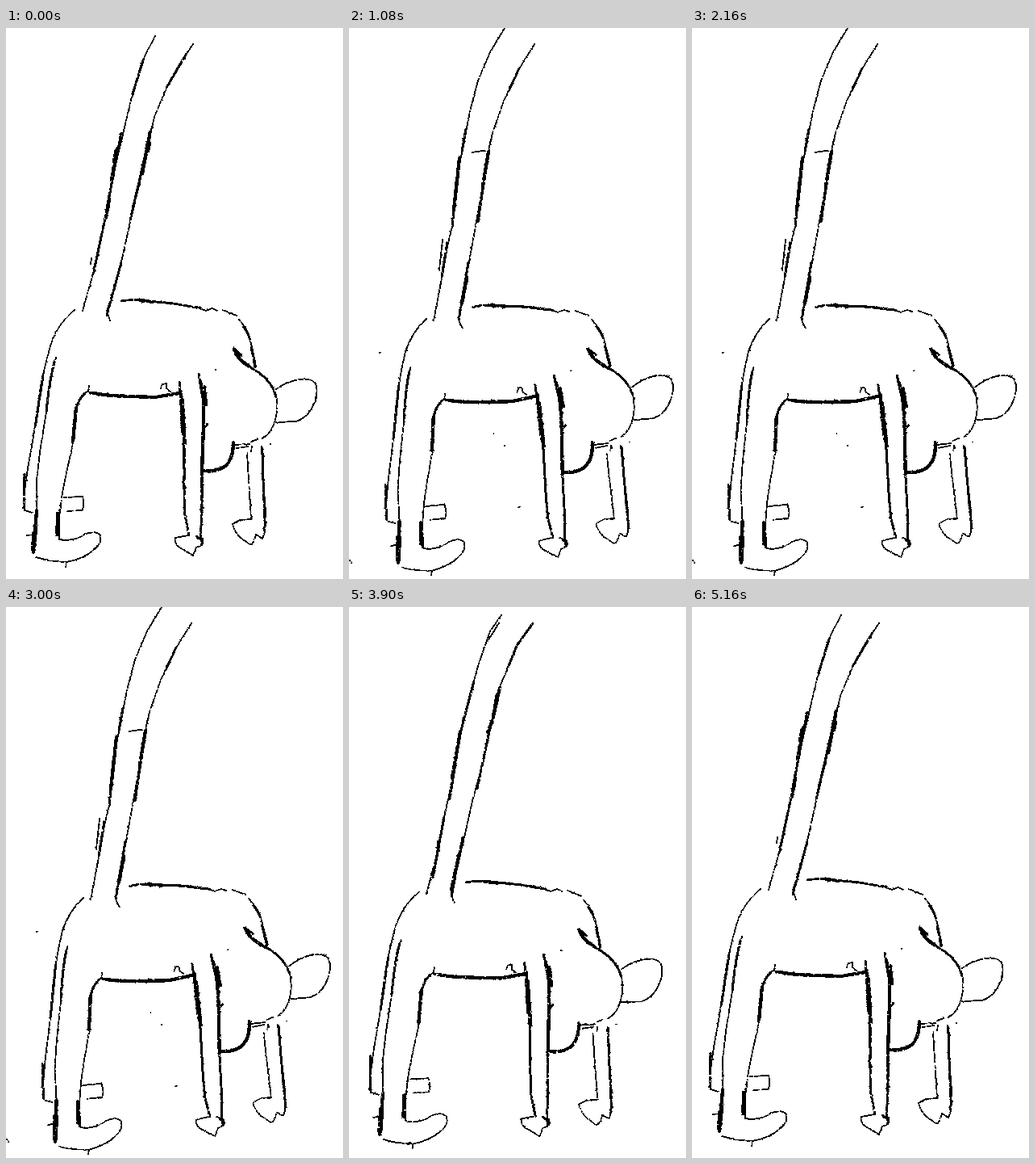
Write an HTML page without scripts that moves like this. It is 418x682 px and loops after 5.34 s.

```html
<!DOCTYPE html>
<html lang="en">
<head>
<meta charset="utf-8">
<title>Swaying sketch</title>
<style>
  html, body { margin: 0; width: 100%; height: 100%; overflow: hidden; background: #fff; }
  .stage { position: relative; width: 418px; height: 682px; overflow: hidden; }
  .strip { display: block; width: 2090px; height: 682px; animation: sway 5.34s step-end infinite; }
  path { fill: none; stroke: #000; stroke-width: 1.5; stroke-linecap: round; stroke-linejoin: round; }
  .mid { stroke-width: 2.7; }
  .bold { stroke-width: 4; }
  .heavy { stroke-width: 6; }

  /* The strip holds five poses side by side; each stop shows one. */
  @keyframes sway {
    0%, 26.96%, 47.19%, 69.66%, 96.62%, 100% { transform: translateX(0); }
    3.37%, 23.59%, 30.33%, 43.82%, 52.8%, 66.29%, 73.03%, 93.25% { transform: translateX(-418px); }
    6.74%, 20.22%, 33.7%, 40.44%, 56.17%, 62.92%, 76.4%, 89.88% { transform: translateX(-836px); }
    10.11%, 16.85%, 37.07%, 59.55%, 79.77%, 86.51% { transform: translateX(-1254px); }
    13.48%, 83.14% { transform: translateX(-1672px); }
  }
</style>
</head>
<body>
<div class="stage">
<svg class="strip" viewBox="0 0 2090 682">
  <defs>
    <!-- Rough, hard-edged pencil line -->
    <filter id="pencil" filterUnits="userSpaceOnUse" x="0" y="0" width="418" height="682" color-interpolation-filters="sRGB">
      <feTurbulence type="fractalNoise" baseFrequency=".28" numOctaves="1" seed="7" result="grain"/>
      <feDisplacementMap in="SourceGraphic" in2="grain" scale="2.6" xChannelSelector="R" yChannelSelector="G" result="rough"/>
      <feColorMatrix in="grain" values="0 0 0 0 0  0 0 0 0 0  0 0 0 0 0  0 0 6 0 -1.3" result="gaps"/>
      <feComposite in="rough" in2="gaps" operator="in"/>
      <feComponentTransfer><feFuncA type="discrete" tableValues="0 1 1"/></feComponentTransfer>
    </filter>

    <g id="body">
      <!-- back and shoulder -->
      <path class="mid" d="M143 338Q158 335 176 338L208 341 242 347"/>
      <path class="bold" d="M166 337L182 339"/>
      <path d="M236 345L248 350 256 347 262 350M269 349L286 356M289 361Q302 375 304 390L310 419M294 370Q306 386 308 415"/>
      <!-- head -->
      <path class="mid" d="M282 397Q287 411 300 418L313 426Q330 438 335 456M283 397L292 405M304 395L309 420"/>
      <path class="bold" d="M285 403Q292 413 302 419"/>
      <path d="M335 455Q338 470 334 485Q330 501 318 508M280 516L302 515M286 520L300 518M304 512L312 509"/>
      <path d="M335 447Q345 440 355 437Q376 431 384 440Q388 452 382 465Q375 482 360 487L335 488"/>
      <path class="bold" d="M282 513Q282 534 271 543Q260 550 246 548"/>
      <!-- far arm -->
      <path d="M299 526L301 560 304 606M305 518L304 524M317 518L319 560 322 600 320 622"/>
      <path class="mid" d="M318 520L319 560 321 610"/>
      <path d="M305 608L290 609 281 614Q284 625 291 631L302 639Q307 640 310 627L318 632Q322 624 322 612"/>
      <!-- near arm -->
      <path class="mid" d="M215 438L218 475 221 520 221 570 222 603 227 628"/>
      <path d="M220 460L223 515"/>
      <path class="bold" d="M217 450L219 500M241 437L246 466M245 462L245 490 243 550"/>
      <path class="mid" d="M239 428L241 440M243 540L243 600 241 633M246 443L249 467M250 490L245 495"/>
      <path class="mid" d="M241 633L236 629M243 632L242 640"/>
      <path d="M226 628L210 631Q208 640 219 645L232 653 236 643 243 640Q247 635 241 630"/>
      <path d="M192 446L194 441 199 440 199 446 204 450"/>
      <!-- belly -->
      <path class="mid" d="M103 451L125 454"/>
      <path class="bold" d="M108 452L130 455 155 456 185 457 215 452"/>
      <!-- near leg -->
      <path d="M103 443L102 449Q92 455 88 468L86 490 83 515 75 550 70 575 66 605 66 630M63 600L62 628"/>
      <path class="mid" d="M98 452Q89 460 87 473M65 600L64 628"/>
      <path class="bold" d="M87 470L83 512"/>
      <path d="M66 629Q63 634 75 634Q90 633 97 627Q112 621 117 628Q119 638 110 645Q97 657 75 661Q50 660 38 655M75 661L74 667"/>
      <path d="M62 408Q53 440 50 475L42 525 38 560 38 600"/>
      <path class="mid" d="M60 413Q54 435 50 475"/>
      <path class="bold" d="M38 598L36 622 34 649"/>
      <path class="heavy" d="M36 618L34 645"/>
      <path d="M26 628L34 627"/>
      <!-- far leg -->
      <path d="M85 349Q65 365 56 390Q46 425 42 450L35 500 27 545 22 580 23 597 33 600M72 581L95 580Q97 588 95 597L76 598"/>
      <path class="mid" d="M46 430L36 495M23 552L22 594"/>
      <path d="M260 423h.5M328 515h.5"/>
    </g>
  </defs>

  <g filter="url(#pencil)">
    <use href="#body"/>
    <path d="M185 10L172 35 156 85 143 140 133 180 122 240 112 290 95 350M106 285L105 292M232 20L215 45 200 72 184 110 176 145 165 195 154 240 143 290 134 325 125 350 129 362"/>
    <path class="mid" d="M170 40L156 85M143 130L122 240 108 305M222 35L200 72M172 160L154 238M143 290L125 356"/>
    <path class="bold" d="M138 150L131 188M128 212L124 235M179 128L169 180"/>
    <path class="heavy" d="M137 153L135 165M177 142L175 152"/>
  </g>

  <g transform="translate(418)"><g filter="url(#pencil)">
    <use href="#body" transform="translate(-.7 4) rotate(-.45)"/>
    <path d="M189 10L175 30 161 70 150 108 137 160 128 215 118 260 108 310 96 355M186 20L172 42M228 20L208 48 196 78 182 110 177 140 167 190 153 240 142 290 132 330 127 355 130 366M110 290L108 315"/>
    <path class="mid" d="M228 20L208 48 196 78M155 92L137 160 125 238M118 260L104 335M177 140L159 225M141 285L127 358"/>
    <path class="bold" d="M187 100L178 140 172 155M138 154L128 212M137 305L127 350"/>
  </g></g>

  <g transform="translate(836)"><g filter="url(#pencil)">
    <use href="#body" transform="translate(-6.7 15.5) rotate(-3)"/>
    <path d="M193 0L175 30 160 65 150 103 140 155 133 185 128 245 122 270 115 310 105 362M230 20L210 52 192 90 178 130 171 160 165 200 157 245 148 295 138 345 136 362 141 372M152 154L174 151M116 262L112 300"/>
    <path class="mid" d="M145 125L140 153M134 185L128 246M122 265L115 308M210 52L198 78M173 152L160 240M148 290L136 362"/>
    <path class="bold" d="M137 161L130 225M173 153L166 195M146 310L140 340"/>
    <path d="M38 402h.5M180 502h.5M193 517h.5M211 593h.5M1 659l2 3"/>
  </g></g>

  <g transform="translate(1254)"><g filter="url(#pencil)">
    <use href="#body" transform="translate(-8.7 15) rotate(-4.4)"/>
    <path d="M194 2L176 31 161 67 151 102 142 140 136 175 131 240 126 275 120 310 110 362M226 19L206 52 191 85 180 125 173 155 167 195 161 240 153 290 145 340 143 358 149 369"/>
    <path class="mid" d="M151 102L142 140 136 175 131 240 120 310M206 52L191 85M180 125L161 235M153 290L143 356"/>
    <path class="bold" d="M140 150L134 200M174 150L168 190"/>
  </g></g>

  <g transform="translate(1672)"><g filter="url(#pencil)">
    <use href="#body" transform="translate(-11.8 14.3) rotate(-5.7)"/>
    <path d="M194 6L178 33 163 68 152 100 143 130 138 165 135 200 134 235 130 270 124 310 116 355 121 364M158 72L150 104M160 78L155 100M222 16L215 35 200 58 187 90 182 120 174 145 170 185 164 230 158 275 154 315 149 350 156 364M226 18L222 28"/>
    <path class="mid" d="M194 6L165 63M154 82L143 130 138 165M222 20L200 58 188 88M174 142L170 190 164 230M157 275L149 350 156 364"/>
    <path class="bold" d="M139 150L135 200 134 235 130 270 124 312M121 328L117 356M154 312L150 345M155 84L152 100M170 180L166 210"/>
  </g></g>
</svg>
</div>
</body>
</html>
```
